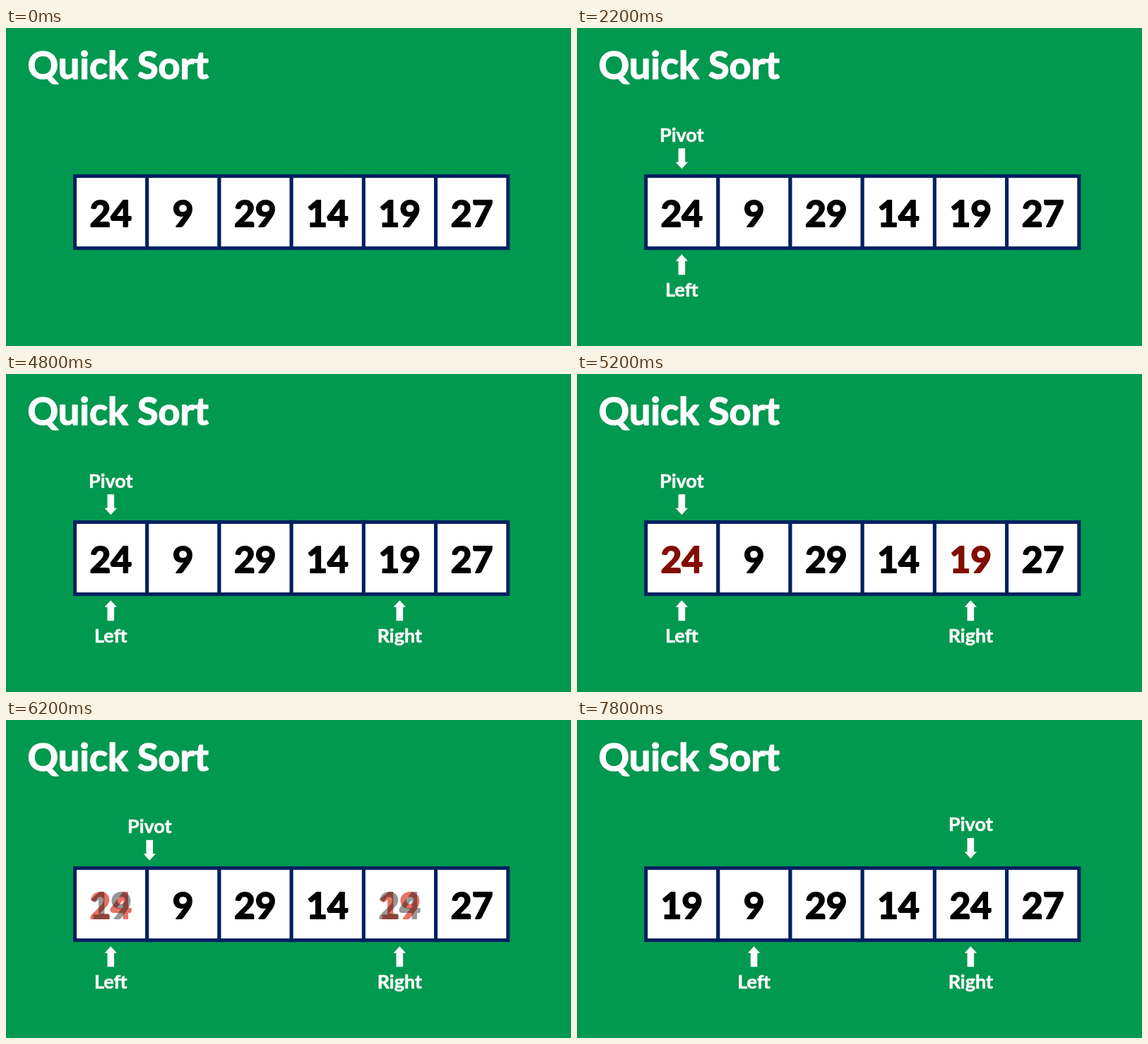
Write an HTML page that moves like this. It is 800 by 450 pixels and loops after 8000 ms.

```html
<!DOCTYPE html>
<html lang="en">
<head>
<meta charset="utf-8">
<title>Quick Sort</title>
<style>
  html, body { margin: 0; width: 100%; height: 100%; overflow: hidden; background: #01984f; }
  svg { display: block; width: 100vw; height: 100vh; }
  text {
    font-family: Lato, "Open Sans", sans-serif; font-weight: 700;
    color: #fff; fill: currentColor; stroke: currentColor; stroke-linejoin: round;
  }
  .title { font-size: 54px; stroke-width: 1.5px; }
  .label { font-size: 27px; stroke-width: .6px; text-anchor: middle; }
  .digit { font-size: 51.5px; stroke-width: 1.9px; text-anchor: middle; color: #000; }
</style>
</head>
<body>
<svg viewBox="0 0 800 450">
  <defs><path id="arrow" d="M-4.8 29h9.600v-19.500h3.900L0 0L-8.700 9.500h3.900z" fill="#fff"/></defs>
  <rect width="800" height="450" fill="#01984f"/>
  <text class="title" x="30.5" y="72.3">Quick Sort</text>
  <g id="cells" fill="#fff" stroke="#002060" stroke-width="5"></g>
  <g id="digits"></g>
  <g id="pivot">
    <text class="label" y="160.5">Pivot</text>
    <use href="#arrow" transform="translate(0 199.3) scale(1 -1)"/>
  </g>
  <g id="left">
    <use href="#arrow" y="320.3"/>
    <text class="label" y="379.5">Left</text>
  </g>
  <g id="right">
    <use href="#arrow" y="320.3"/>
    <text class="label" y="379.5">Right</text>
  </g>
</svg>
<script>
const LOOP = 8000, STEP = 200;
const values = [24, 9, 29, 14, 19, 27];
const RED = [217, 22, 0];

const $ = id => document.getElementById(id);
const cellX = i => 148.3 + 102.27 * i;
const clamp = v => Math.min(1, Math.max(0, v));
const ramp = (t, start, end) => clamp((t - start) / (end - start));
const ease = p => p < 0.5 ? 2 * p * p : 1 - 2 * (1 - p) * (1 - p);

function add(parent, tag, attrs, text = "") {
  const el = document.createElementNS("http://www.w3.org/2000/svg", tag);
  for (const key in attrs) el.setAttribute(key, attrs[key]);
  el.textContent = text;
  parent.append(el);
  return el;
}

const addDigit = (value, i) =>
  add($("digits"), "text", { class: "digit", x: cellX(i), y: 280.6 }, value);

values.forEach((v, i) =>
  add($("cells"), "rect", { x: 97.6 + 102.2 * i, y: 209.6, width: 102.2, height: 102 }));
const digits = values.map(addDigit);
const before = [digits[0], digits[4]];
const after = [addDigit(19, 0), addDigit(24, 4)];

function place(id, x, y, opacity) {
  $(id).setAttribute("transform", `translate(${x} ${y})`);
  $(id).setAttribute("opacity", opacity);
}

function draw(t) {
  const pivotMove = ease(ramp(t, 5990, 6800));
  const rightMove = ease(ramp(t, 3830, 4750));
  const leftMove = ease(ramp(t, 6970, 7800));
  place("pivot", cellX(4 * pivotMove), -3.3 * pivotMove, ramp(t, 700, 1150));
  place("left", cellX(leftMove), 0, ramp(t, 1700, 2150));
  place("right", cellX(5 - rightMove), 0, ramp(t, 2800, 3200));

  const red = ramp(t, 4900, 5400);
  const swap = ramp(t, 6000, 6500);
  const color = `rgb(${RED.map(c => Math.round(c * red))})`;
  before.forEach(el => {
    el.style.color = color;
    el.setAttribute("opacity", 1 - swap);
  });
  after.forEach(el => el.setAttribute("opacity", swap));
}

// The picture advances five times a second.
function tick() {
  const t = performance.now() % LOOP;
  draw(Math.floor(t / STEP) * STEP);
  requestAnimationFrame(tick);
}
tick();
</script>
</body>
</html>
```
